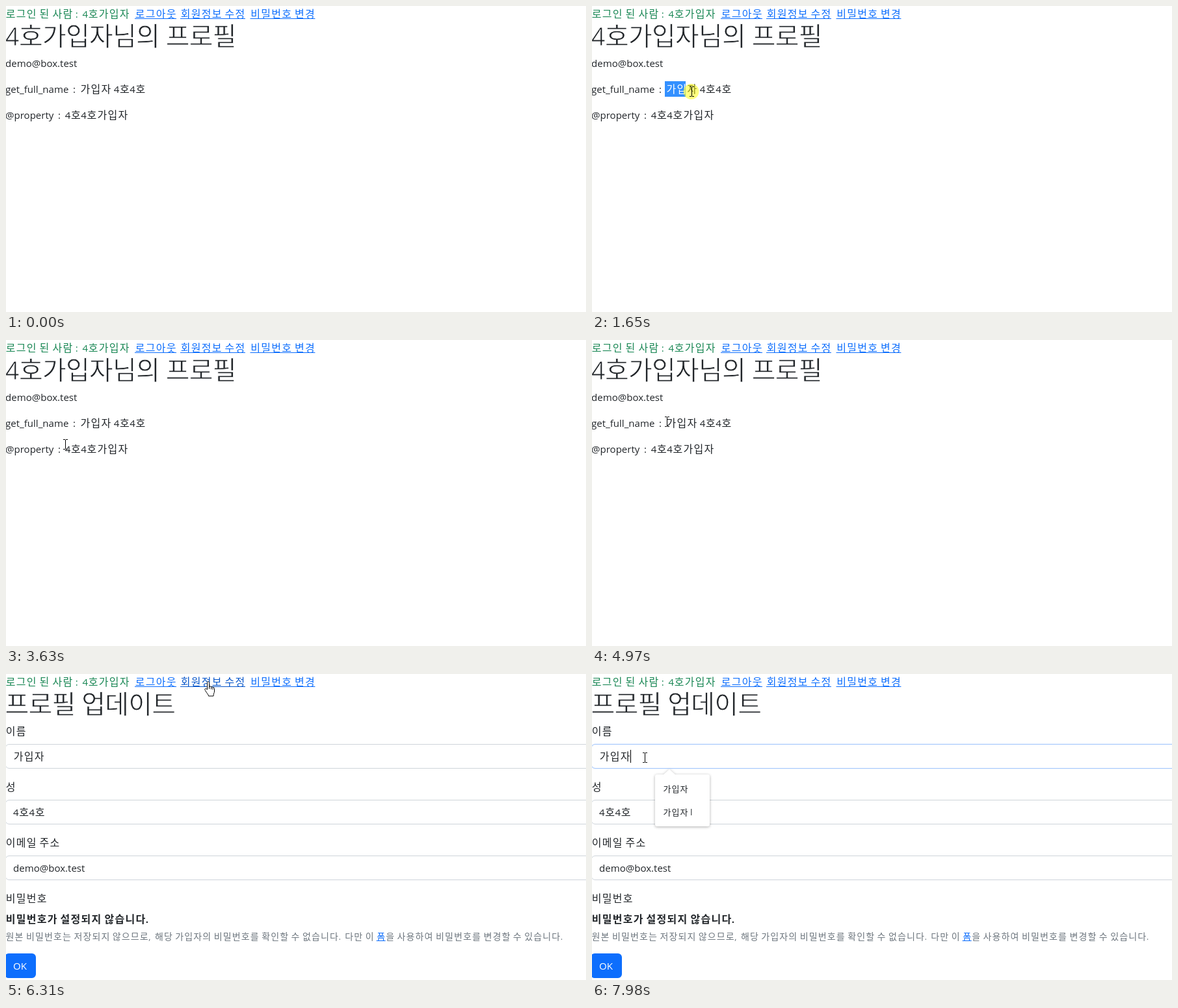
An HTML page with a canvas that plays this animation: 892x472 px, repeating every 8 s.

```html
<!DOCTYPE html>
<html lang="ko">
<head>
<meta charset="utf-8">
<style>
  html, body { margin: 0; width: 100%; height: 100%; overflow: hidden; background: #fff; }
  canvas { display: block; }
</style>
</head>
<body>
<canvas id="stage" width="892" height="472"></canvas>
<script>
const ctx = document.getElementById('stage').getContext('2d');
const LOOP = 8000;
const INK = '#212529', BLUE = '#0d6efd', HOVER = '#0a58ca', GREEN = '#198754';

// Pointer steps: [start ms, shape, left, top]
const STEPS = [
  [0, 'none', 0, 0],
  [330, 'arrow', 521, 276],
  [650, 'arrow', 208, 150],
  [980, 'arrow', 121, 148],
  [1320, 'beam', 110, 126],
  [1650, 'beam', 150, 124],
  [1980, 'beam', 212, 126],
  [2310, 'arrow', 241, 136],
  [2640, 'beam', 129, 159],
  [2970, 'beam', 98, 160],
  [3310, 'beam', 94, 156],
  [3630, 'beam', 88, 153],
  [3970, 'beam', 97, 128],
  [4300, 'beam', 118, 122],
  [4630, 'beam', 117, 120],
  [4970, 'beam', 112, 118],
  [5300, 'beam', 142, 33],
  [5640, 'beam', 262, 5],
  [5970, 'hand', 302, 10],
  [6310, 'hand', 304, 11],
  [6640, 'beam', 195, 367],
  [6970, 'beam', 53, 218],
  [7310, 'beam', 67, 130],
  [7640, 'beam', 78, 121]
];

const SHAPES = {
  arrow: new Path2D('M.5 .5V16.5L4.3 13L6.8 18.5L9.3 17.5L6.9 12H11.8Z'),
  hand: new Path2D('M5.5 13V2.5C5.5 0 8.5 0 8.5 2.5V9C9 7.5 11.5 7.7 11.5 9.3' +
    'C12 8.2 14 8.6 14 10.2C14.8 9.3 16.5 9.8 16.5 11.5V16C16.5 18 15 19 15 23' +
    'H7.5C7.5 20.5 4.5 18.5 2.5 14.5C.5 11.5 3 10.5 5.5 13Z')
};

// Draws mixed Hangul and Latin text and returns the x where it ends.
// `thin` trims the strokes by that width, for light lettering on white.
function text(str, x, y, { size = 16, advance = size, color = INK, weight = 400, underline = false, thin = 0 } = {}) {
  const start = x;
  ctx.fillStyle = color;
  ctx.wordSpacing = size * 0.175 + 'px';
  for (const run of str.match(/[가-힣]+|[^가-힣]+/g)) {
    const hangul = run >= '가';
    const gap = hangul ? advance - size * 0.92 : 0;
    ctx.font = hangul
      ? `${weight} ${size}px "Noto Sans CJK KR", "Noto Sans CJK", sans-serif`
      : `${weight} ${size * 0.94}px "Open Sans", sans-serif`;
    ctx.letterSpacing = gap + 'px';
    ctx.fillText(run, x + gap / 2, y);
    if (thin) {
      ctx.strokeStyle = '#fff';
      ctx.lineWidth = thin;
      ctx.strokeText(run, x + gap / 2, y);
    }
    x += ctx.measureText(run).width;
  }
  if (underline) ctx.fillRect(start, y + 1, x - start, 1);
  return x;
}

function box(x, y, w, h, radius, fill, stroke) {
  ctx.beginPath();
  ctx.roundRect(x, y, w, h, radius);
  ctx.fillStyle = fill;
  ctx.fill();
  if (stroke) {
    ctx.strokeStyle = stroke;
    ctx.lineWidth = 1;
    ctx.stroke();
  }
}

const heading = str => text(str, -1, 61, { size: 40, advance: 36, thin: 0.8 });

function nav(hovering) {
  text('로그인 된 사람 : 4호가입자', -1, 18, { color: GREEN });
  const link = (str, x, color = BLUE) => text(str, x, 18, { color, underline: true });
  link('로그아웃', 198);
  link('회원정보 수정', 268, hovering ? HOVER : BLUE);
  link('비밀번호 변경', 375.5);
}

function profile(t) {
  heading('4호가입자님의 프로필');
  text('demo@box.test', -1, 94);
  const fullName = color => text('get_full_name : 가입자 4호4호', -1, 134, { color });
  fullName(INK);
  text('@property : 4호4호가입자', -1, 174);

  if (t >= 1650 && t < 2640) {
    const width = t < 1980 ? 32 : 104;
    ctx.save();
    ctx.beginPath();
    ctx.rect(112, 116, width, 24);
    ctx.clip();
    ctx.fillStyle = '#3390ff';
    ctx.fillRect(112, 116, width, 24);
    fullName('#fff');
    ctx.restore();
  }
}

function field(label, value, y, focused) {
  text(label, -1, y);
  if (focused) box(-2, y + 13.5, 902, 39, 7, '#dbe9ff');
  box(-1, y + 14.5, 900, 37, 6, '#fff', focused ? '#a6c8fb' : '#ced4da');
  text(value, 11, y + 39);
}

function suggestions() {
  ctx.save();
  ctx.shadowColor = 'rgba(0,0,0,.32)';
  ctx.shadowBlur = 4;
  ctx.shadowOffsetY = 1;
  ctx.beginPath();
  ctx.roundRect(97, 155, 84, 80, 3);
  ctx.moveTo(110, 155);
  ctx.lineTo(119, 147);
  ctx.lineTo(128, 155);
  ctx.closePath();
  ctx.fillStyle = '#fff';
  ctx.fill();
  ctx.restore();
  text('가입자', 109, 182, { size: 13 });
  text('가입자 l', 109, 218, { size: 13 });
}

function form(t) {
  const focused = t >= 7980;
  heading('프로필 업데이트');
  field('이름', '가입자', 94, focused);
  field('성', '4호4호', 180);
  field('이메일 주소', 'demo@box.test', 266);
  text('비밀번호', -1, 352);
  text('비밀번호가 설정되지 않습니다.', -1, 384, { weight: 700 });

  const note = { size: 14, color: '#6c757d' };
  let x = text('원본 비밀번호는 저장되지 않으므로, 해당 가입자의 비밀번호를 확인할 수 없습니다. 다만 이 ', -1, 410, note);
  x = text('폼', x, 410, { size: 14, color: BLUE, underline: true });
  text('을 사용하여 비밀번호를 변경할 수 있습니다.', x, 410, note);

  box(-2, 431, 48, 38, 6, BLUE);
  text('OK', 11, 456, { color: '#fff' });
  if (focused) {
    ctx.fillStyle = '#000';
    ctx.fillRect(59, 117, 1, 20);
    suggestions();
  }
}

function pointer(t) {
  const [start, shape, x, y] = STEPS.findLast(step => step[0] <= t);
  if (shape === 'none') return;
  ctx.save();
  ctx.translate(x, y);
  if (start >= 1650 && start <= 2310) {
    ctx.beginPath();
    if (shape === 'arrow') ctx.arc(0, 0, 12, 0, 7);
    else ctx.arc(2.5, 8, 12, 0, 7);
    ctx.fillStyle = 'rgba(255,255,0,.5)';
    ctx.fill();
  }
  if (shape === 'beam') {
    ctx.fillStyle = '#000';
    for (const row of [0, 15]) {
      ctx.fillRect(0, row, 3, 1);
      ctx.fillRect(4, row, 3, 1);
    }
    ctx.fillRect(3, 1, 1, 14);
  } else {
    ctx.fillStyle = '#fff';
    ctx.strokeStyle = '#000';
    ctx.lineWidth = 1;
    ctx.fill(SHAPES[shape]);
    ctx.stroke(SHAPES[shape]);
    if (shape === 'hand') ctx.stroke(new Path2D('M8.5 9V12M11.5 9.5V12.5M14 10.5V13'));
  }
  ctx.restore();
}

function draw() {
  const t = performance.now() % LOOP;
  ctx.fillStyle = '#fff';
  ctx.fillRect(0, 0, 892, 472);
  nav(t >= 5970 && t < 6640);
  (t < 6310 ? profile : form)(t);
  pointer(t);
  requestAnimationFrame(draw);
}
draw();
</script>
</body>
</html>
```
